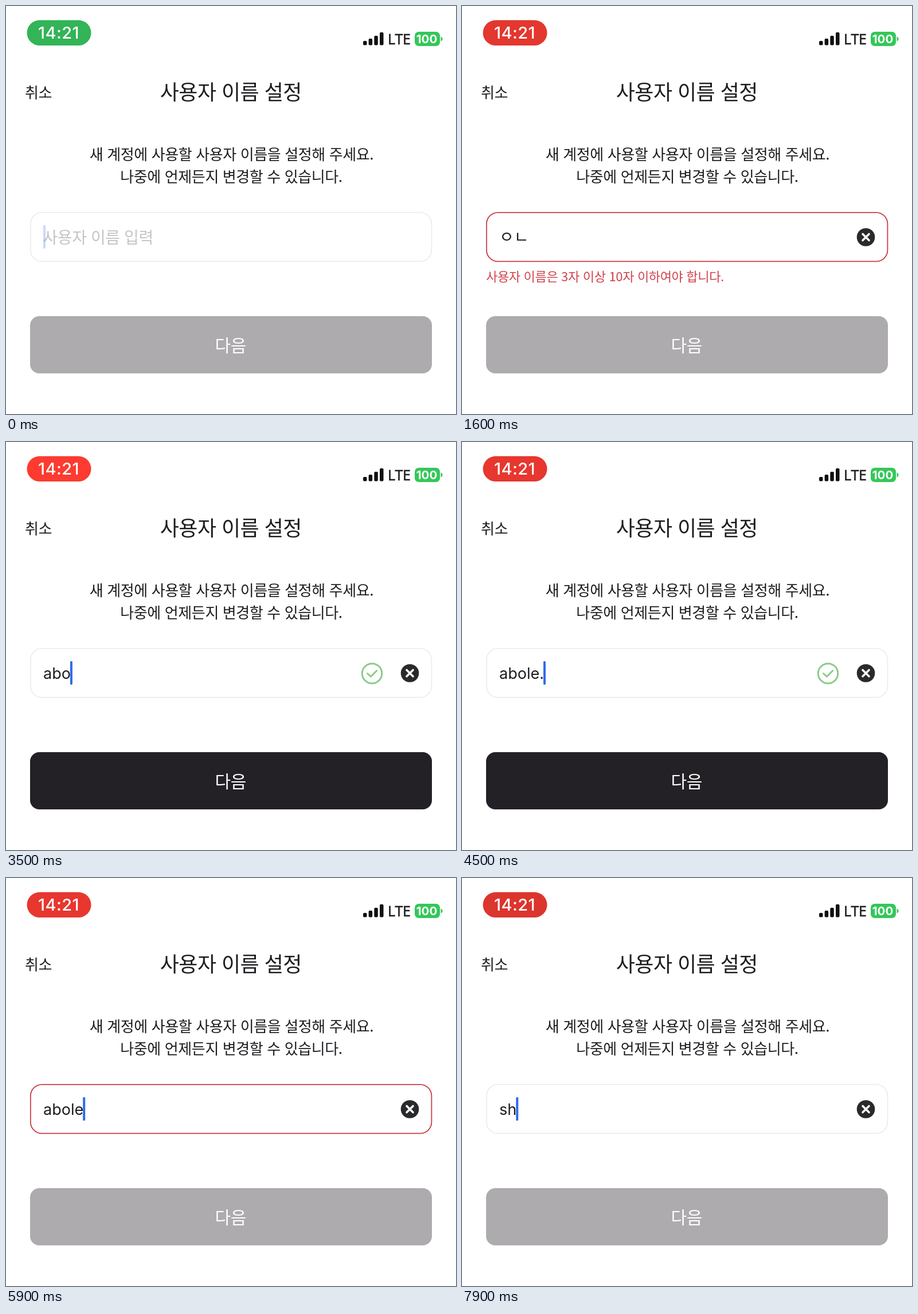
Write an HTML page that moves like this. It is 785 px wide and 713 px high and loops after 8 s.

```html
<!DOCTYPE html>
<html lang="ko">
<head>
<meta charset="utf-8">
<title>사용자 이름 설정</title>
<style>
  html, body { margin: 0; width: 100%; height: 100%; overflow: hidden; background: #fff; }
  svg { display: block; width: 785px; height: 713px; }
  text {
    font-family: "Noto Sans CJK KR", "Noto Sans CJK", sans-serif;
    font-weight: 350; letter-spacing: -.015em; fill: #1d1c20; white-space: pre;
  }
  .mid { text-anchor: middle; }
  .body { font-size: 26px; }
  #time { font: 500 29px Inter, sans-serif; letter-spacing: .4px; fill: #fff; }
  #net { font: 500 25px "Noto Sans", sans-serif; letter-spacing: -.2px; stroke: #1d1c20; stroke-width: .5px; }
  #level { font: 700 20.5px Inter, sans-serif; letter-spacing: 0; fill: #fff; }
  #value { font: 400 27px Inter, "Noto Sans CJK KR", sans-serif; letter-spacing: 0; }
  #value.jamo { font-size: 28px; font-weight: 350; }
  #hint { font-size: 28px; fill: #c5c4c8; }
  #error { font-size: 22px; fill: #d0424c; }
</style>
</head>
<body>
<svg viewBox="0 0 785 713">
  <rect id="pill" x="36.5" y="24.7" width="112" height="44.4" rx="22.2"/>
  <text id="time" class="mid" x="92" y="57">14:21</text>

  <g fill="#111">
    <rect x="623" y="61" width="6.5" height="7.5" rx="2"/>
    <rect x="632.6" y="57" width="6.5" height="11.5" rx="2"/>
    <rect x="642.3" y="52" width="6.5" height="16.5" rx="2"/>
    <rect x="652" y="46" width="6.5" height="22.5" rx="2"/>
  </g>
  <text id="net" x="666" y="67">LTE</text>
  <g fill="#34c759">
    <rect x="713" y="45" width="44" height="25" rx="7"/>
    <path d="M758.5 53.5q3 1 3 4t-3 4z"/>
  </g>
  <text id="level" class="mid" x="734" y="65">100</text>

  <text class="body" x="33" y="160.5">취소</text>
  <text class="mid" x="392.3" y="163.5" font-size="36">사용자 이름 설정</text>
  <text class="body mid" x="393.5" y="269">새 계정에 사용할 사용자 이름을 설정해 주세요.</text>
  <text class="body mid" x="393" y="308">나중에 언제든지 변경할 수 있습니다.</text>

  <rect id="field" x="42.8" y="360.8" width="699.6" height="85.6" rx="20" fill="#fff"/>
  <text id="hint" x="64.5" y="414.5">사용자 이름 입력</text>
  <text id="value" x="65" y="414"></text>
  <rect id="caret" y="383" width="4" height="41" rx="1.5" fill="#2f6beb"/>
  <g id="check" fill="none" stroke="#8acb88" stroke-width="3">
    <circle cx="638.5" cy="404.5" r="17.3"/>
    <path d="M630.5 404.5l5.8 5.5 10.5-10.5" stroke-linecap="round" stroke-linejoin="round"/>
  </g>
  <g id="clear">
    <circle cx="704.5" cy="404" r="15.8" fill="#2a292c"/>
    <path d="M699 398.5l11 11m0-11l-11 11" stroke="#fff" stroke-width="3.6" stroke-linecap="round"/>
  </g>
  <text id="error" x="42" y="480.5">사용자 이름은 3자 이상 10자 이하여야 합니다.</text>

  <rect id="next" x="42" y="542" width="701" height="100" rx="16"/>
  <text class="mid" x="391.7" y="603.5" font-size="30" style="fill:#fff">다음</text>
</svg>
<script>
const LOOP = 8000, RED_FROM = 500, PULSE = 3000, BRIGHT_AT = 6700;

// [time, text in the field]
const KEYS = [
  [-610, ''], [400, 'ㅇ'], [850, 'ㅇㄴ'], [2100, 'ㅇ'], [2300, ''],
  [2800, 'a'], [3050, 'ab'], [3300, 'abo'], [3600, 'abol'], [3800, 'abole'],
  [4300, 'abole.'], [5000, 'abole'], [5250, 'abole/'], [5900, 'abole'],
  [6090, 'abolem'], [6800, 'abolemu'], [6900, 'abolemus'], [7000, 'abolemusi'],
  [7120, 'abolemusic'], [7600, ''], [7700, 's'], [7850, 'sh']
];

// [time, state of the form]
const STATES = [
  [0, 'idle'], [800, 'short'], [2300, 'idle'], [3500, 'valid'],
  [4700, 'bad'], [5100, 'valid'], [5650, 'bad'], [6000, 'valid'], [7600, 'idle']
];

const $ = id => document.getElementById(id);
const set = (id, attrs) => Object.entries(attrs).forEach(([k, v]) => $(id).setAttribute(k, v));
const show = (id, on) => set(id, { visibility: on ? 'visible' : 'hidden' });
const stepAt = (steps, t) => steps.filter(s => s[0] <= t).pop();
const clamp = v => Math.min(1, Math.max(0, v));

function pillColor(t) {
  if (t < RED_FROM) return '#32b457';
  const wave = (1 + Math.cos((t - BRIGHT_AT) / PULSE * 2 * Math.PI)) / 2;
  const k = Math.pow(wave, 1.3);
  return `rgb(${218 + 37 * k}, ${53 + 6 * k}, ${46 + 2 * k})`;
}

// Solid after a key, then fades out and back in once a second
function caretAlpha(age) {
  const p = age % 1000;
  return p < 850 ? clamp((650 - p) / 150) : (p - 850) / 150;
}

function draw(t) {
  const [pressed, text] = stepAt(KEYS, t);
  const state = stepAt(STATES, t)[1];
  const wrong = state === 'short' || state === 'bad';
  const valid = state === 'valid';

  set('pill', { fill: pillColor(t) });
  const value = $('value');
  value.textContent = text;
  value.classList.toggle('jamo', text.startsWith('ㅇ'));
  const width = text ? value.getComputedTextLength() : 0;
  set('caret', { x: Math.max(65, 64 + width), opacity: caretAlpha(t - pressed) });

  show('hint', !text);
  show('clear', text);
  show('check', valid);
  show('error', state === 'short');
  set('field', { stroke: wrong ? '#cc3b45' : '#ebebed', 'stroke-width': wrong ? 1.8 : 1.6 });
  set('next', { fill: valid ? '#232125' : '#adabae' });
}

const start = performance.now();
function tick() {
  draw((performance.now() - start) % LOOP);
  requestAnimationFrame(tick);
}
tick();
</script>
</body>
</html>
```
